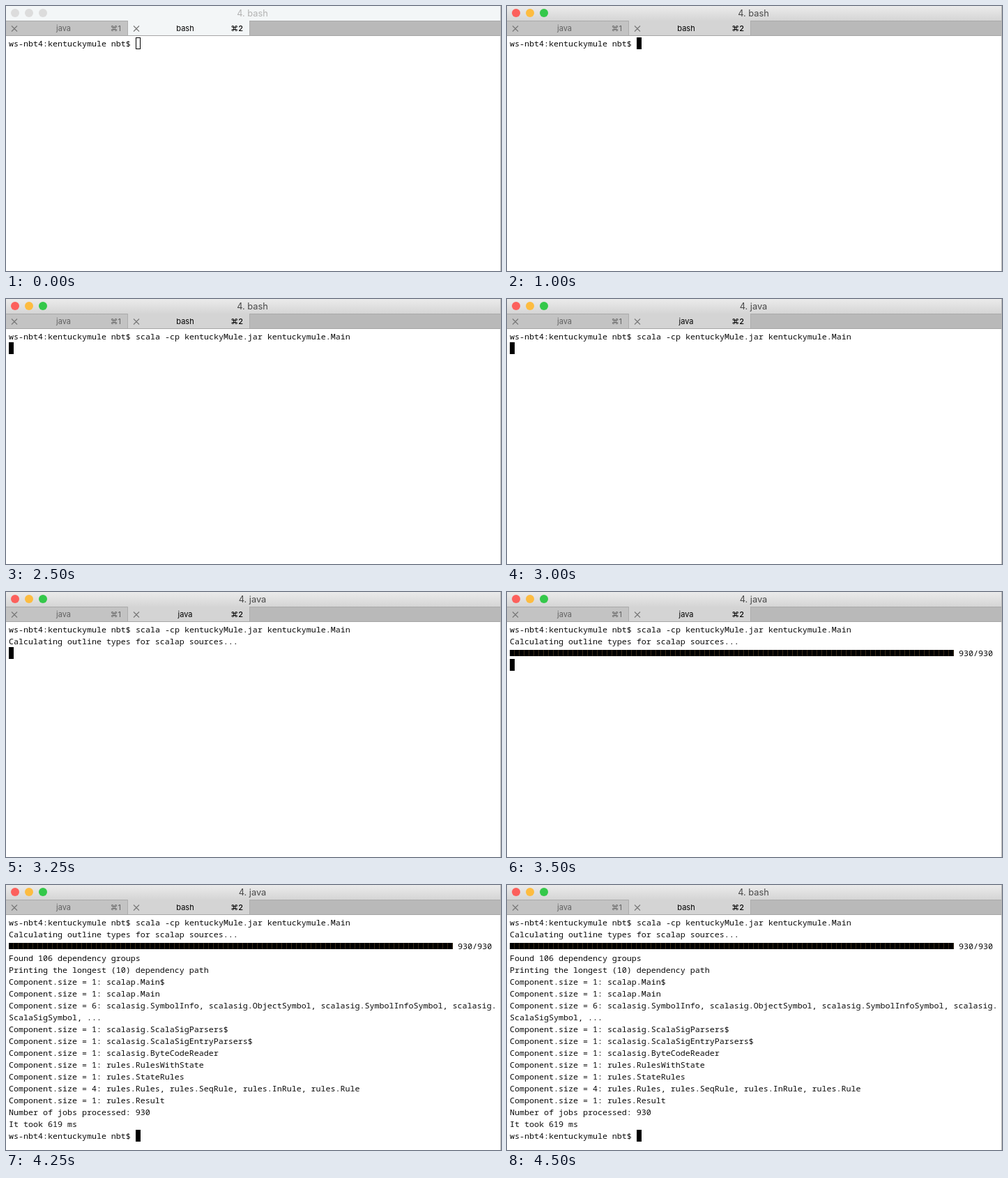
An HTML page for the animation above (6000 ms loop, 710 by 380 pixels).

```html
<!DOCTYPE html>
<html lang="en">
<head>
<meta charset="utf-8">
<title>Terminal</title>
<style>
  html, body { margin: 0; width: 100%; height: 100%; overflow: hidden; background: #fff; }
  svg { display: block; width: 710px; height: 380px; }
  .ui { font-family: Inter, "DejaVu Sans", sans-serif; font-size: 11px; }
  .mono { font-family: "Noto Sans Mono", "DejaVu Sans Mono", monospace; font-size: 11.6667px; fill: #0a0a0a; white-space: pre; }
  .mid { text-anchor: middle; }
  .end { text-anchor: end; }
</style>
</head>
<body>
<svg viewBox="0 0 710 380" xmlns="http://www.w3.org/2000/svg">
  <defs>
    <linearGradient id="chrome" x1="0" y1="0" x2="0" y2="1">
      <stop offset="0" stop-color="#ebebeb"/>
      <stop offset="1" stop-color="#d5d5d5"/>
    </linearGradient>
    <pattern id="blocks" x="4" y="83" width="7" height="9" patternUnits="userSpaceOnUse">
      <rect width="7" height="9" fill="#000"/>
      <rect x="6" width="1" height="9" fill="#3a2c1a"/>
    </pattern>
  </defs>
  <rect width="710" height="380" fill="#fff"/>
  <rect id="titleBar" width="710" height="21"/>
  <g id="lights"></g>
  <text id="title" class="ui mid" x="353.5" y="15" style="font-size:12.8px"></text>

  <rect y="21" width="710" height="21" fill="#b9b9b9"/>
  <rect y="21" width="174" height="21" fill="#c3c3c3"/>
  <rect id="activeTab" x="175" y="21" width="174" height="21"/>
  <path id="topLine" d="M0 21.5H175M349 21.5H710" stroke="#a9a9a9"/>
  <path d="M174.5 21V42M349.5 21V42" stroke="#adadad"/>
  <path d="M0 42.5H710" stroke="#a6a6a6"/>
  <path d="M8 28.5l8 8m0-8l-8 8M183 28.5l8 8m0-8l-8 8" stroke="#777" stroke-width="1.1" fill="none"/>
  <g class="ui" fill="#626262">
    <text class="mid" x="82.5" y="36">java</text>
    <text class="end" x="165" y="36">⌘1</text>
  </g>
  <g class="ui" fill="#000">
    <text id="tabName" class="mid" x="257" y="36"></text>
    <text class="end" x="340" y="36" font-weight="500">⌘2</text>
  </g>

  <g id="screen" class="mono"></g>
  <rect id="bar" x="4" y="83" width="637" height="9" fill="url(#blocks)"/>
  <rect id="cursor"/>
  <path d="M709.5 0V380" stroke="#b4b4b4"/>
</svg>
<script>
const LOOP = 6000, LEFT = 4, TOP = 45, CELL = 7, ROW = 17;
const NS = 'http://www.w3.org/2000/svg';
const $ = id => document.getElementById(id);

function set(el, attrs) {
  for (const k in attrs) el.setAttribute(k, attrs[k]);
  return el;
}
const add = (parent, tag, attrs) =>
  parent.appendChild(set(document.createElementNS(NS, tag), attrs));

const prompt = 'ws-nbt4:kentuckymule nbt$ ';
const command = 'scala -cp kentuckyMule.jar kentuckymule.Main';
const size = (n, names) => `Component.size = ${n}: ${names}`;

// Output rows after the command: [time shown, text, column]
const output = [
  [3250, 'Calculating outline types for scalap sources...'],
  [3500, '930/930', 92],
  ...[
    'Found 106 dependency groups',
    'Printing the longest (10) dependency path',
    size(1, 'scalap.Main$'),
    size(1, 'scalap.Main'),
    size(6, 'scalasig.SymbolInfo, scalasig.ObjectSymbol, scalasig.SymbolInfoSymbol, scalasig.'),
    'ScalaSigSymbol, ...',
    size(1, 'scalasig.ScalaSigParsers$'),
    size(1, 'scalasig.ScalaSigEntryParsers$'),
    size(1, 'scalasig.ByteCodeReader'),
    size(1, 'rules.RulesWithState'),
    size(1, 'rules.StateRules'),
    size(4, 'rules.Rules, rules.SeqRule, rules.InRule, rules.Rule'),
    size(1, 'rules.Result'),
    'Number of jobs processed: 930',
    'It took 619 ms',
    prompt
  ].map(text => [3750, text])
];

const lines = [];
function addLine(from, text, row, col = 0) {
  const el = add($('screen'), 'text', { x: LEFT + col * CELL, y: TOP + row * ROW + 13 });
  el.textContent = text;
  lines.push({ from, el });
}
addLine(0, prompt, 0);
addLine(1750, command, 0, prompt.length);
output.forEach(([from, text, col], i) => addLine(from, text, i + 1, col));

const lights = ['#fc605c', '#fdbc40', '#34c84a'].map((color, i) =>
  ({ color, el: add($('lights'), 'circle', { cx: 13 + 20 * i, cy: 10, r: 6 }) }));

// Cursor cells: [time, column, row]
const stops = [
  [0, prompt.length, 0],
  [1750, prompt.length + command.length, 0],
  [2500, 0, 1],
  [3250, 0, 2],
  [3500, 0, 3],
  [3750, prompt.length, output.length]
];

function render(t) {
  const focused = t >= 1000;
  const during = (a, b) => t >= a && t < b ? 'java' : 'bash';

  set($('titleBar'), { fill: focused ? 'url(#chrome)' : '#f3f6f7' });
  set($('activeTab'), { fill: focused ? '#d4d4d4' : '#f3f6f7' });
  set($('title'), { fill: focused ? '#484848' : '#b2b2b2' });
  lights.forEach(({ color, el }) => set(el, { fill: focused ? color : '#dcdcdc' }));
  $('tabName').textContent = during(2750, 4250);
  $('title').textContent = '4. ' + during(3000, 4500);

  lines.forEach(({ from, el }) => set(el, { visibility: t >= from ? 'visible' : 'hidden' }));
  set($('bar'), { visibility: t >= 3500 ? 'visible' : 'hidden' });

  const [, col, row] = stops.filter(s => t >= s[0]).pop();
  const inset = focused ? 0 : 0.5;
  set($('cursor'), {
    x: LEFT + col * CELL + inset,
    y: TOP + row * ROW + inset,
    width: CELL - 2 * inset,
    height: ROW - 2 * inset,
    fill: focused ? '#000' : 'none',
    stroke: focused ? 'none' : '#000'
  });
}

const start = performance.now();
function tick() {
  render((performance.now() - start) % LOOP);
  requestAnimationFrame(tick);
}
tick();
</script>
</body>
</html>
```
